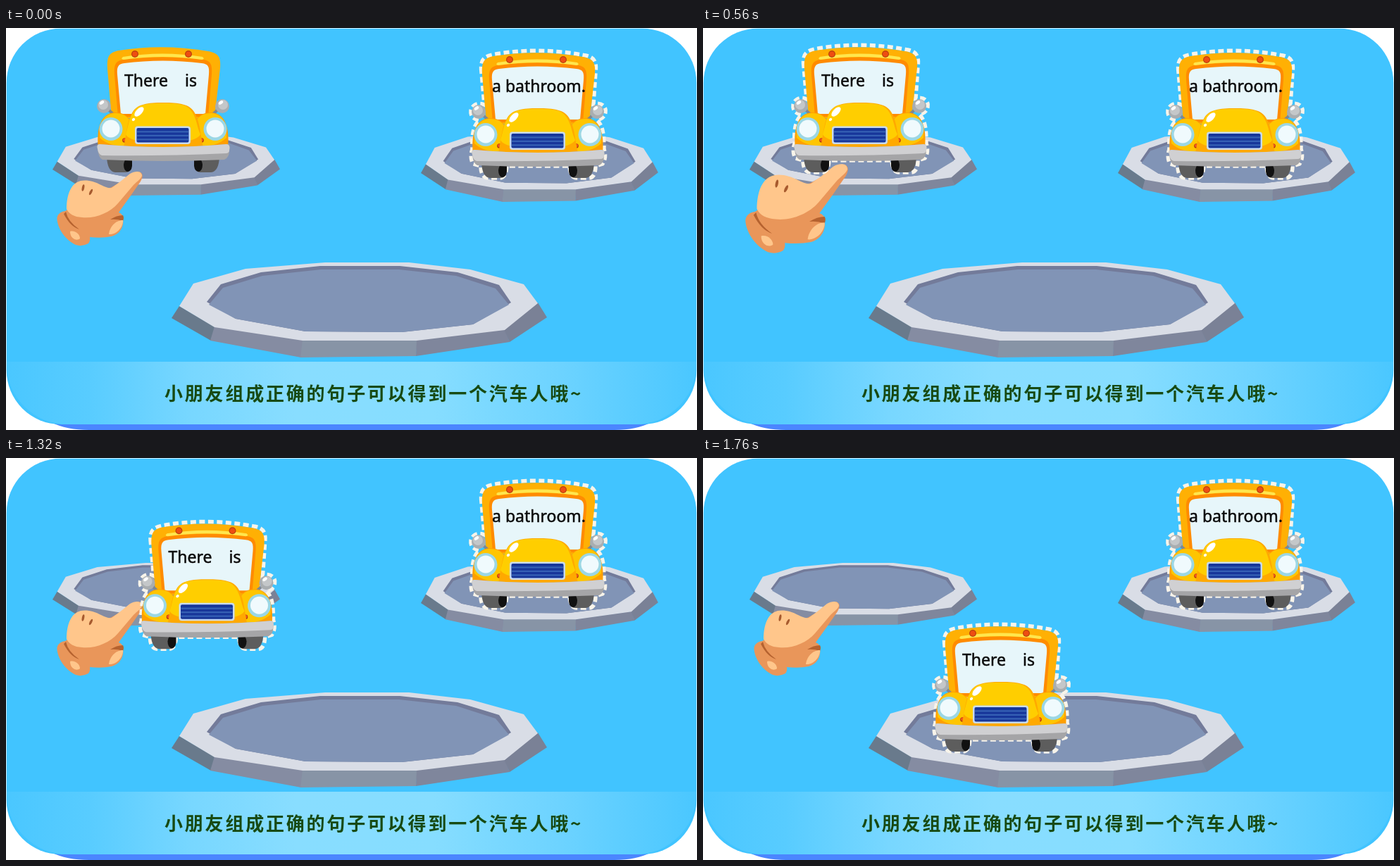
An HTML page with a canvas for the animation above (3 s loop, 981 px wide and 571 px high).

```html
<!DOCTYPE html>
<html lang="zh">
<head>
<meta charset="utf-8">
<title>Sentence cars</title>
<style>
html, body { margin: 0; width: 100%; height: 100%; overflow: hidden; background: #fff; }
canvas { display: block; width: 981px; height: 571px; }
</style>
</head>
<body>
<canvas id="stage"></canvas>
<script>
const W = 981, H = 571, LOOP = 3000, STEP = 40;
const canvas = document.getElementById('stage');
const ctx = canvas.getContext('2d');
const dpr = window.devicePixelRatio || 1;
canvas.width = W * dpr;
canvas.height = H * dpr;

const clamp = v => Math.max(0, Math.min(1, v));

function fill(color, d) {
  ctx.fillStyle = color;
  ctx.fill(new Path2D(d));
}

function line(color, width, d) {
  ctx.strokeStyle = color;
  ctx.lineWidth = width;
  ctx.stroke(new Path2D(d));
}

function oval(color, x, y, rx, ry = rx, turn = 0) {
  ctx.fillStyle = color;
  ctx.beginPath();
  ctx.ellipse(x, y, rx, ry, turn, 0, Math.PI * 2);
  ctx.fill();
}

function box(color, x, y, w, h, r) {
  ctx.fillStyle = color;
  ctx.beginPath();
  ctx.roundRect(x, y, w, h, r);
  ctx.fill();
}

function at(x, y, sx, sy, draw) {
  ctx.save();
  ctx.translate(x, y);
  ctx.scale(sx, sy);
  draw();
  ctx.restore();
}

// Draws a part and its reflection across the car's middle line.
function both(draw) {
  draw();
  at(446, 0, -1, 1, draw);
}

function background() {
  ctx.fillStyle = '#fff';
  ctx.fillRect(0, 0, W, H);
  fill('#4b86ff', 'M64 560Q86 571 118 571H864Q895 571 916 560Z');
  box('#41c4ff', 0.7, 0.7, 979.6, 562.3, 77);
  const g = ctx.createLinearGradient(0, 0, W, 0);
  g.addColorStop(0, '#4ac7ff');
  g.addColorStop(0.12, '#58ccff');
  g.addColorStop(0.27, '#78d7ff');
  g.addColorStop(0.42, '#88ddff');
  g.addColorStop(0.62, '#86ddff');
  g.addColorStop(0.8, '#6dd3ff');
  g.addColorStop(1, '#4ac7ff');
  ctx.fillStyle = g;
  ctx.beginPath();
  ctx.roundRect(1, 474, 979, 89, [0, 0, 86, 86]);
  ctx.fill();
}

function caption() {
  ctx.font = 'bold 26px "Noto Sans CJK SC", "Noto Sans CJK", sans-serif';
  ctx.letterSpacing = '2.8px';
  ctx.textAlign = 'left';
  ctx.fillStyle = '#174a12';
  ctx.fillText('小朋友组成正确的句子可以得到一个汽车人哦~', 225, 529);
  ctx.letterSpacing = '0px';
}

function platform() {
  fill('#697a8c', 'M11 62L0 79L56 111L62 92Z');
  fill('#858ca2', 'M61 91L55 111L184 135L187 110Z');
  fill('#8794a6', 'M186 110L183 135L347 133L349 110Z');
  fill('#7f869c', 'M348 110L347 133L480 113L473 95Z');
  fill('#7a8196', 'M472 95L480 113L533 78L520 57Z');
  fill('#d9dde6', 'M11 62L31 30L105 9L218 0H337L424 10L500 31L520 58L473 96L348 111H186L61 92Z');
  fill('#737b9a', 'M50 56L70 31L127 14L211 5H324L406 14L465 32L482 57L428 88L327 99L190 98L91 80Z');
  fill('#8194b6', 'M53 60L73 36L129 19L212 10H323L404 19L460 37L479 60L428 88L327 99L190 98L91 80Z');
}

const SILHOUETTE = 'M143 55C141 39 145 33 158 30Q222 18 291 31C303 33 307 40 305 55L302 100' +
  'C312 97 321 103 319 112C318 119 312 122 307 123C316 131 317 145 317 164Q321 176 315 185' +
  'L305 188Q305 205 295 205H278Q269 205 268 188H179Q178 205 169 205H152Q142 204 142 188' +
  'L131 185Q126 176 130 164C129 145 131 131 140 123C131 121 127 117 128 109C130 101 138 97 147 101Z';

function outline(alpha) {
  if (alpha <= 0) return;
  ctx.save();
  ctx.globalAlpha = alpha;
  ctx.setLineDash([8, 4.5]);
  line('#f8f4ea', 5.5, SILHOUETTE);
  ctx.restore();
}

function sideParts() {
  line('#7d8793', 4, 'M143 114L152 122');
  oval('#a9adb0', 139, 111, 10);
  oval('#c4c7c9', 138, 109, 7);
  fill('#ff9f00', 'M131 170C128 140 136 121 154 120C168 119 177 128 181 140V172Z');
  fill('#ffc500', 'M133 156C132 135 139 122 154 121C168 120 177 129 181 141V169Q148 170 133 156Z');
  oval('#9bd7e5', 149, 143.5, 16.5);
  oval('#f0fafd', 149, 143, 12.5);
  oval('#a83312', 168.5, 159.5, 3.3);
  oval('#f2591b', 168.5, 159, 2.5);
}

function wheel() {
  fill('#5d5d5d', 'M143 183H178V198Q177 205 170 205H155Q144 204 143 183Z');
  fill('#111', 'M172 184H179V196Q178 204 172 204Q167 202 167 194Q168 187 172 184Z');
}

function car(x, y, text, textX, glow) {
  ctx.save();
  ctx.translate(x, y);
  outline(glow);
  both(wheel);

  // Cabin
  fill('#ffb004', 'M150 128L144 58C143 40 146 35 160 32Q222 22 287 33C302 36 305 41 304 57L296 128Z');
  fill('#ff8b00', 'M159 126L154 66C153 51 156 47 166 45Q222 38 281 45C290 47 293 51 292 66L287 126Z');
  fill('#ffe64d', 'M166 41Q222 32 279 41Q283 44 278 45Q222 37 167 45Q162 44 166 41Z');
  fill('#e7f6fa', 'M163 122L158 66C157 54 160 51 168 50Q222 43 278 50C287 51 289 55 288 66L283 122Z');
  for (const lamp of [183, 259]) {
    oval('#b7410c', lamp, 37, 5);
    oval('#ee4d12', lamp, 37, 3.8);
  }

  both(sideParts);
  oval('#fff', 136, 106, 3.6, 2.2, -0.6);
  oval('#fff', 305, 106, 3.6, 2.2, -0.6);

  // Hood
  fill('#ffa900', 'M167 170C172 145 172 132 180 119C187 108 201 106 223 106C246 106 260 108 267 119C275 132 275 145 280 170Z');
  fill('#ffce00', 'M170 151C174 139 174 129 181 119C188 108 202 107 223 107C245 107 257 108 264 119C271 130 271 140 276 151C270 168 176 168 170 151Z');
  oval('#fff', 189, 119, 8.5, 4.2, -0.8);
  oval('#fff', 181, 130, 2.4, 1.9, -0.7);

  // Grille
  box('#c9dbee', 183, 139.5, 79, 25.5, 4);
  box('#17369a', 185.5, 142, 74, 20.5, 2);
  for (let i = 0; i < 3; i++) box('#3560b4', 186, 146.3 + i * 5.5, 73, 2.3, 0);

  // Bumper
  fill('#a5a5a7', 'M130 172Q128 165 133 165Q223 173 313 165Q319 165 317 174Q317 184 310 187Q223 191 137 187Q131 184 130 172Z');
  fill('#d0d0d2', 'M130 172Q128 165 133 165Q223 173 313 165Q319 165 317 174Q317 177 313 178Q223 182 136 181Q131 179 130 172Z');

  ctx.font = '23px "Noto Sans", sans-serif';
  ctx.textAlign = 'center';
  ctx.fillStyle = ctx.strokeStyle = '#0b0b0b';
  ctx.lineWidth = 0.5;
  ctx.fillText(text, textX, 83);
  ctx.strokeText(text, textX, 83);
  ctx.restore();
}

function hand() {
  fill('#e9965a', 'M84 260C76 261 72 266 72.500 272C74 287 86 302 99 308Q108 311 117 306Q120 302 119 297' +
    'Q136 299 150 296C161 293 168 283 166 270Q166 264 160 262Q176 240 191 218Q197 207 189 204' +
    'L150 226L100 250Z');
  fill('#ffc68b', 'M86 257C86 241 90 225 101 219C110 214 124 217 135 223Q144 228 150 227' +
    'Q163 218 176 207C184 202 193 203 193 210C191 215 186 218 181 223L159 249' +
    'C147 263 126 271 108 269Q91 268 86 257Z');
  fill('#b5622f', 'M85 261Q88 275 104 286Q91 282 82 264Z');
  fill('#b5622f', 'M148 272Q157 266 166 266Q168 269 166 274Q157 271 148 272Z');
  fill('#ffc68b', 'M146 293C147 283 155 273 166 273C167 282 157 294 146 293Z');
  fill('#ffc68b', 'M91 289C98 287 105 293 105 299C101 303 91 300 91 289Z');
  oval('#a75a2e', 109.5, 227, 1.7, 4.8, 0.2);
  oval('#a75a2e', 120.5, 233, 1.7, 4.6, 0.45);
}

const handScale = t => 1 + 0.335 * Math.max(0, 1 - Math.abs(t - 400) / 400);

// The dashed edge fades in twice.
function glowAt(t) {
  const p = t <= 560 ? t / 560 : (t - 560) / 440;
  return clamp(p) ** 1.6;
}

function draw(t) {
  ctx.setTransform(dpr, 0, 0, dpr, 0, 0);
  background();
  caption();
  at(66, 149, 0.606, 0.659, platform);
  at(589, 148, 0.632, 0.733, platform);
  at(235, 333, 1, 1, platform);

  ctx.save();
  const s = handScale(t);
  ctx.translate(133, 256.5);
  ctx.scale(s, s);
  ctx.translate(-133, -256.5);
  hand();
  ctx.restore();

  const move = clamp((t - 1120) / 640);
  car(532, 8, 'a bathroom.', 224.5, 1);
  car(200 * move, 212 * move, 'There    is', 219.5, glowAt(t));
}

const start = performance.now();
function tick() {
  const t = (performance.now() - start) % LOOP;
  draw(Math.floor(t / STEP) * STEP);
  requestAnimationFrame(tick);
}
tick();
</script>
</body>
</html>
```
